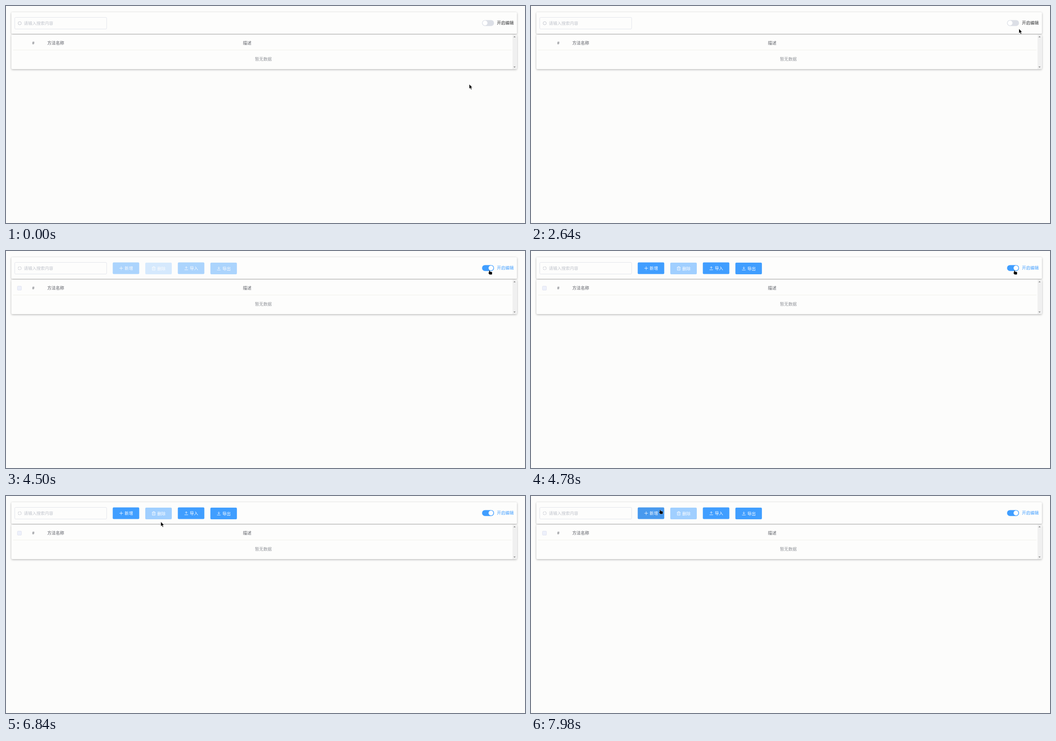
An HTML page for the animation above (8 s loop, 1155 by 485 pixels).

```html
<!DOCTYPE html>
<html lang="zh-CN">
<head>
<meta charset="utf-8">
<title>方法列表</title>
<style>
  html, body { margin: 0; width: 100%; height: 100%; overflow: hidden; background: #fcfcfb; }
  .card {
    position: absolute; left: 12px; width: 1124.5px; background: #fdfdfc; border-radius: 2px;
    box-shadow: 0 1.6px 4px rgba(0, 0, 0, .25), 0 0 4px rgba(0, 0, 0, .05);
  }
  svg { position: absolute; left: 0; top: 0; display: block; }
  text { font: 9.33px "Noto Sans CJK SC", "Noto Sans CJK", sans-serif; }
  .head { font-weight: 700; fill: #8b8d92; }
  .icon { fill: none; stroke: #fff; stroke-width: .85; }
</style>
</head>
<body>
<div class="card" style="top:14px;height:47.5px"></div>
<div class="card" style="top:64px;height:77px"></div>
<svg width="1155" height="485" viewBox="0 0 1155 485">
  <rect x="19.5" y="25.5" width="204.5" height="26" rx="2" fill="#fdfdfc" stroke="#dfe1e9" stroke-width=".9"/>
  <circle id="lens" cx="30.5" cy="38.5" r="3.6" fill="none" stroke="#b9bdc6" stroke-width=".9"/>
  <text x="39.8" y="42" fill="#c0c4cc">请输入搜索内容</text>

  <g id="buttons"></g>

  <rect id="track" x="1059.4" y="31.4" width="26.7" height="13.3" rx="6.65"/>
  <circle id="knob" cy="38" r="5.4" fill="#fff"/>
  <text id="label" x="1092.4" y="41.4">开启编辑</text>

  <rect id="check" x="25.4" y="78.5" width="9" height="9" rx="1.3" fill="#edf0fb" stroke="#dcdfec" stroke-width=".8"/>
  <text class="head" x="58" y="86">#</text>
  <text class="head" x="92" y="86">方法名称</text>
  <text class="head" x="527.3" y="86">描述</text>
  <path d="M16 98.4H1125" stroke="#eff1e9"/>
  <text x="554" y="122" fill="#909399">暂无数据</text>

  <rect x="1127.3" y="64" width="9" height="77" fill="#f0f0f0"/>
  <path d="M1129.3 70 1131.7 67.3 1134.1 70ZM1129.3 135.2 1131.7 137.9 1134.1 135.2Z" fill="#8a8a8a"/>

  <g id="cursor" stroke="#fff" stroke-width=".4" stroke-linejoin="round">
    <path id="arrow" d="M0 0V9.8L2.2 7.9 4 11.8 5.5 11.1 3.8 7.3H6.8Z"/>
    <path id="hand" d="M1 .6Q2-.4 2.8.8L3.2 3 7 3.8Q8.2 4.2 8 5.6L7.6 9.8H1.6L1.4 8.4-.5 6.4Q-.6 5 .8 5Z"/>
  </g>
</svg>
<script>
const LOOP = 8000;
const $ = id => document.getElementById(id);

const OFF = [220, 223, 230], INK = [48, 49, 51];
const BLUE = [64, 158, 255], HOVER = [102, 177, 255], PRESSED = [58, 142, 230];
const icons = {
  plus: "M0-4V4M-4 0H4",
  bin: "M-4-2.5H4M-3-2.5V4H3V-2.5M-1.5-2.5V-4H1.5V-2.5M-1-.5V2M1-.5V2",
  up: "M-4 3.5H4M0 1.5V-3.5M-2.5-1 0-3.5 2.5-1",
  down: "M-4 3.5H4M0-4V1M-2.5-1.5 0 1 2.5-1.5"
};

function button([icon, name, fill], i) {
  return `<g transform="translate(${237.5 + 72.45 * i} ${25.5 + i % 2 * .5})">
    <rect width="59" height="26" rx="2.2" fill="${fill}"/>
    <path class="icon" transform="translate(18.8 13)" d="${icons[icon]}"/>
    <text x="26.6" y="16.6" fill="#fff">${name}</text></g>`;
}
$("buttons").innerHTML = [
  ["plus", "新增", "#409eff"],
  ["bin", "删除", "#a0cfff"],
  ["up", "导入", "#409eff"],
  ["down", "导出", "#409eff"]
].map(button).join("");
const addFill = $("buttons").querySelector("rect");

const ramp = (t, from, to) => Math.min(1, Math.max(0, (t - from) / (to - from)));
const smooth = p => p * p * (3 - 2 * p);
const mix = (a, b, p) => a.map((v, i) => v + (b[i] - v) * p);
const rgb = c => `rgb(${c.map(Math.round)})`;

// Each stroke of the mouse: when it runs, where it ends, how far it sags.
const moves = [
  { from: 1800, to: 2540, end: [1086, 51], sag: 0 },
  { from: 2640, to: 3360, end: [1075, 47], sag: 0 },
  { from: 3480, to: 3920, end: [1074, 43], sag: -3 },
  { from: 5000, to: 5480, end: [707, 95], sag: 6 },
  { from: 5840, to: 6160, end: [396, 51], sag: 24 },
  { from: 6440, to: 7260, end: [290, 32], sag: 16 },
  { from: 7420, to: 7960, end: [285.5, 30.5], sag: 0 }
];

function pointer(t) {
  let pos = [1031, 175];
  for (const { from, to, end, sag } of moves) {
    const p = smooth(ramp(t, from, to));
    pos = mix(pos, end, p);
    pos[1] += sag * 4 * p * (1 - p);
  }
  return pos;
}

function draw(t) {
  const [x, y] = pointer(t);
  const hand = (t >= 3560 && t < 5040) || t >= 7240;
  $("cursor").setAttribute("transform", `translate(${x.toFixed(1)} ${y.toFixed(1)})`);
  $("hand").style.display = hand ? "" : "none";
  $("arrow").style.display = hand ? "none" : "";

  // The switch starts to tint, pauses briefly, then slides over.
  const on = .13 * ramp(t, 4180, 4220) + .87 * ramp(t, 4320, 4500);
  $("track").setAttribute("fill", rgb(mix(OFF, BLUE, on)));
  $("knob").setAttribute("cx", 1066.1 + 13.2 * on);
  $("label").setAttribute("fill", rgb(mix(INK, BLUE, on)));
  $("check").style.display = t < 4180 ? "none" : "";

  $("buttons").setAttribute("opacity", smooth(ramp(t, 4320, 4720)));
  $("lens").setAttribute("stroke-dasharray", t < 4500 ? "none" : "4.4 1.25");
  const hover = mix(BLUE, HOVER, ramp(t, 7250, 7350));
  addFill.setAttribute("fill", rgb(mix(hover, PRESSED, ramp(t, 7940, 8000))));
}

const start = performance.now();
function tick() {
  draw((performance.now() - start) % LOOP);
  requestAnimationFrame(tick);
}
tick();
</script>
</body>
</html>
```
